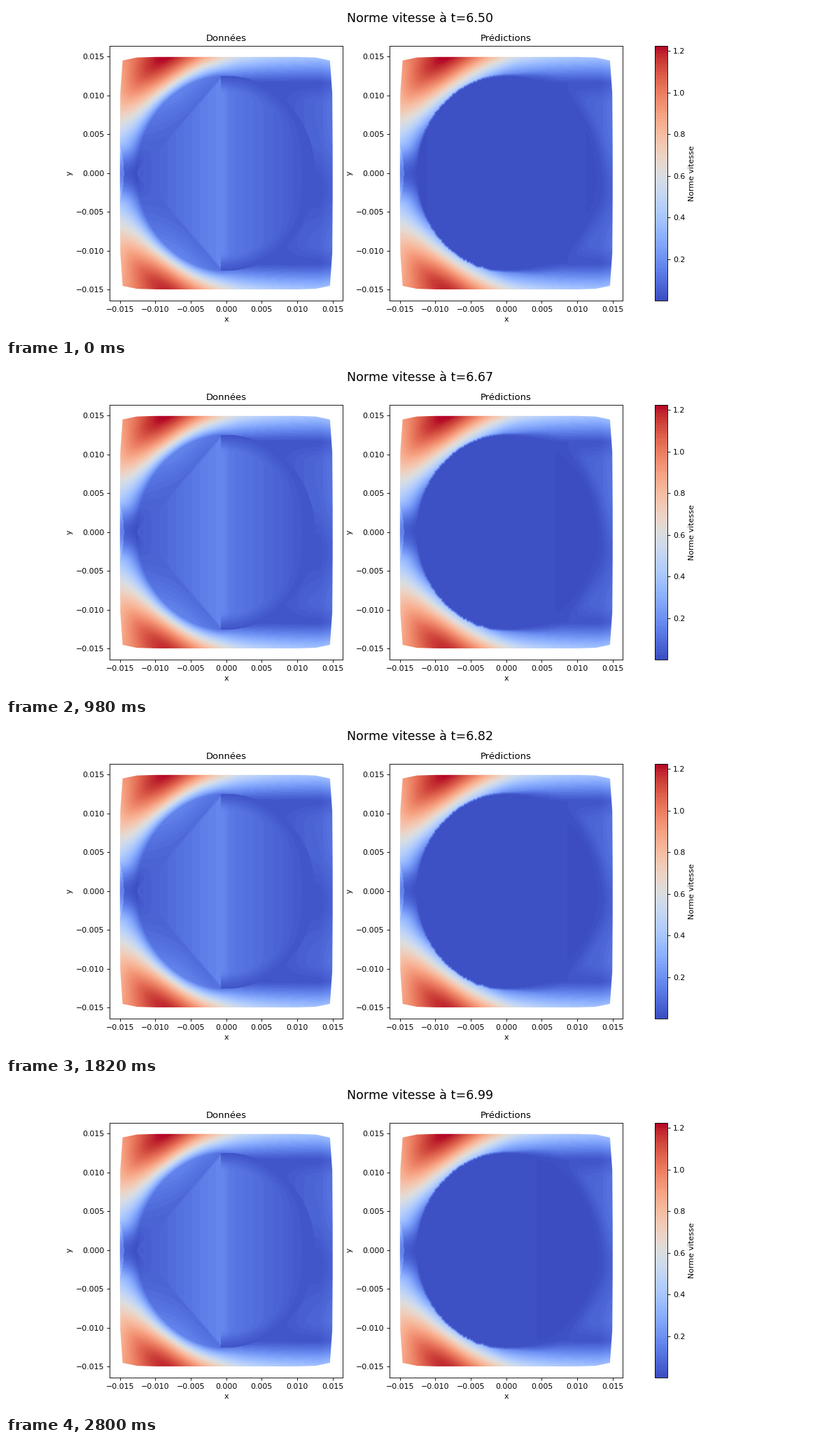
Write a matplotlib script that moves like this. It is 1183x473 px and loops after 2.94 s.

```python
import numpy as np
import matplotlib.pyplot as plt
from matplotlib.animation import FuncAnimation
from matplotlib.colors import ListedColormap
from matplotlib.patches import Polygon

FRAMES, STEP = 21, 140
VMAX, BANDS = 1.225, 98
R = 12.6        # cylinder radius, mm
HALF = 15.05    # half width of the sampled square, mm
DPI = 1183 / 15


def smooth(a):
    a = np.clip(a, 0, 1)
    return a * a * (3 - 2 * a)


def mix(a, b, w):
    return a + (b - a) * w


def wave(n, period, start):
    return np.cos(2 * np.pi * (n - start) / period)


X, Y = np.meshgrid(np.linspace(-HALF, HALF, 305), np.linspace(-HALF, HALF, 334))
AY = np.abs(Y)
D = np.hypot(X, Y) - R                  # distance to the wall
PHI = np.degrees(np.arctan2(AY, -X))    # angle from the upstream point

# Angular roughness of the predicted wall
rng = np.random.default_rng(4)
ROUGH = np.interp(np.degrees(np.arctan2(Y, X)), np.linspace(-180, 180, 400),
                  rng.normal(0, 0.06, 400))
FAST = smooth((PHI - 15) / 25) * smooth((100 - PHI) / 30)


def upstream(phi, d):
    """Boundary layer speed: angular peak times a wall profile."""
    peak = 1.35 * np.exp(-((phi - 66) / 52) ** 2)
    peak *= 0.3 + 0.7 * smooth(phi / 16)
    width = 3.1 + 0.9 * smooth((phi - 50) / 40)
    corner = 0.22 * smooth((d - 4) / 4)
    return peak * np.tanh((d + 0.4) / width) - corner * smooth(phi / 40)


def wake(n):
    """Slow region behind the cylinder with its swaying dark core."""
    core = np.exp(-((Y + 2.7 * wave(n, 6.7, 0.7)) / 4.5) ** 2)
    slow = 0.025 + 0.055 * smooth((X - 6) / 8) * (1 - core) * smooth((12 - AY) / 3)
    slow += 0.03 * smooth((X - 13) / 2)
    edge = 0.34 + 0.24 * np.exp(-np.maximum(X, 0) / 5)
    return slow + edge * np.clip((AY - 11.6) / 3.3, 0, 1) ** 1.25


def outer_flow(n, shift=0):
    """Speed around the cylinder, extended inwards from its wall."""
    y = Y - 0.25 * wave(n, 4.5, 3.2)
    phi = np.degrees(np.arctan2(np.abs(y), -X))
    left = upstream(phi, np.maximum(D, 0) + shift)
    gain = 1 + 0.022 * np.sign(Y) * wave(n, 6.7, 0.7)
    left = left * mix(1, gain, smooth((AY - 3) / 8))
    lens = X < -14.95 + 0.5 * (1 - (Y / 3.3) ** 2)
    left += np.where(lens & (AY < 3.3), 0.1, 0)
    return mix(left, wake(n), smooth((X + 1.5) / 3.5))


def data_field(n):
    # left: coarse triangles between the wall and the diamond
    edge = (AY - (X + R) * R / 11.9) / 1.41
    along = np.clip((X + R) / 11.9, 0, 1)
    rim = 0.055 + 0.05 * along
    frac = np.clip(edge / np.maximum(edge - D, 1e-6), 0, 1)
    sliver = mix(rim, upstream(PHI, 0), frac)
    ramp = mix(rim, 0.04 + 0.13 * along, smooth(-edge / 0.4))
    left = np.where(edge > 0, sliver, ramp)
    # right: vertical bands fading towards the wall
    band = 0.17 - 0.035 * smooth((X + 0.7) / 1.4) - 0.009 * np.clip(X, 0, 12)
    right = mix(0.03, band, smooth((0.1 - D) / 2.5))
    inside = np.where(X < -0.7, left, right)
    return np.where(D < 0, inside, outer_flow(n))


def model_field(n):
    shift = 0.6 * FAST * np.exp(-np.maximum(D, 0) / 1.5)
    width = 0.45 + 2 * smooth(X / 8)
    wall = smooth((D + 0.15 + ROUGH * FAST) / width)
    inside = 0.014 + 0.005 * np.cos(X / 6 + n)
    return mix(inside, outer_flow(n, shift), wall)


cmap = ListedColormap(plt.get_cmap("coolwarm")((np.arange(BANDS) + 0.5) / BANDS))

# Rounded outline of the mesh, mirrored into four quadrants
quarter = np.array([(10, 14.97), (12.6, 14.9), (14.62, 14.52),
                    (14.95, 10.3), (15, 3.3)])
half = np.vstack([quarter, quarter[::-1] * [1, -1]])
hull = np.vstack([half, half[::-1] * [-1, 1]]) * 1e-3

fig, axes = plt.subplots(1, 2, figsize=(1183 / DPI, 473 / DPI), dpi=DPI)
fields = (data_field, model_field)
images = []
for ax, name, field in zip(axes, ("Données", "Prédictions"), fields):
    im = ax.imshow(field(0), origin="lower", aspect="auto", cmap=cmap,
                   extent=np.array([-1, 1, -1, 1]) * HALF * 1e-3,
                   vmin=0, vmax=VMAX,
                   interpolation="bilinear", interpolation_stage="data")
    im.set_clip_path(Polygon(hull, transform=ax.transData))
    ticks = np.arange(-3, 4) * 0.005
    ax.set(title=name, xlabel="x", ylabel="y", xticks=ticks, yticks=ticks,
           xlim=(-.01647, .01644), ylim=(-.016416, .016416))
    images.append(im)

fig.colorbar(images[0], ax=axes, label="Norme vitesse",
             ticks=np.arange(1, 7) * 0.2)
title = fig.suptitle("", fontsize=16)


def update(n):
    title.set_text(f"Norme vitesse à t={6.504 + 0.0243 * n:.2f}")
    for im, field in zip(images, fields):
        im.set_data(field(n))
    return [title, *images]


anim = FuncAnimation(fig, update, frames=FRAMES, interval=STEP,
                     repeat=True, repeat_delay=0)
plt.show()
```
